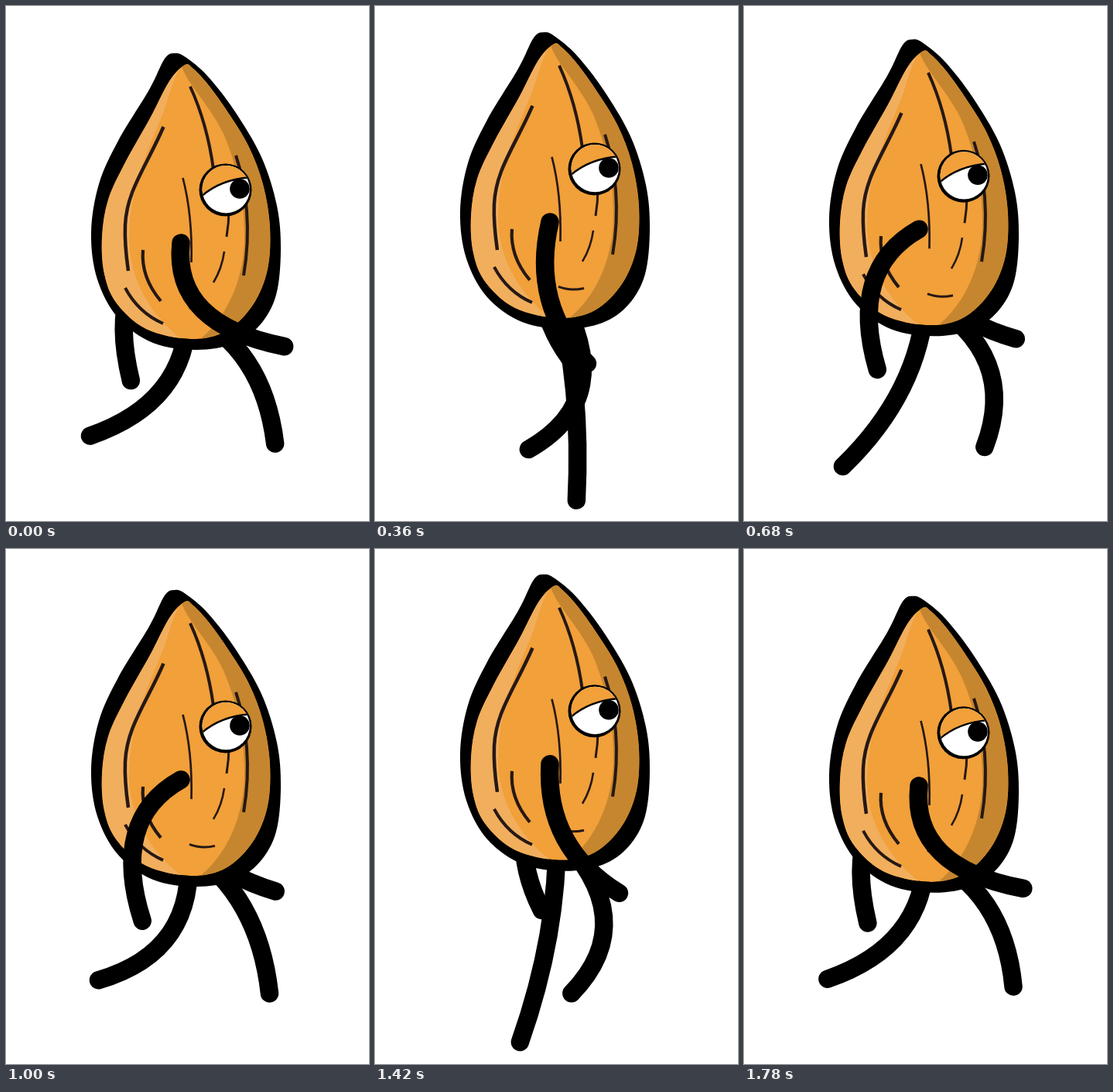
Recreate the animation shown at these times as an HTML page with a canvas. Size 469x665 px, loop 1.8 s.

```html
<!DOCTYPE html>
<html lang="en">
<head>
<meta charset="utf-8">
<title>Walking almond</title>
<style>
html, body { margin: 0; width: 100%; height: 100%; overflow: hidden; background: #fff; }
canvas { display: block; }
</style>
</head>
<body>
<canvas id="stage" width="469" height="665"></canvas>
<script>
const ctx = document.getElementById('stage').getContext('2d');
const { sin, cos, max, PI } = Math;
const LOOP = 1800, STEP = 20, DEG = PI / 180;
const INK = '#000', GROOVE = '#261815', SKIN = '#f1a03a', LIGHT = '#f1ae5c', SHADE = '#c6862f';

// Smooth closed curve through a few points.
function blob(points) {
  const n = points.length, path = new Path2D();
  const at = i => points[(i + n) % n];
  path.moveTo(...points[0]);
  for (let i = 0; i < n; i++) {
    const a = at(i - 1), b = at(i), c = at(i + 1), d = at(i + 2);
    path.bezierCurveTo(b[0] + (c[0] - a[0]) / 6, b[1] + (c[1] - a[1]) / 6,
      c[0] - (d[0] - b[0]) / 6, c[1] - (d[1] - b[1]) / 6, ...c);
  }
  path.closePath();
  return path;
}

const shell = blob([[218, 61], [232, 66], [260, 90], [295, 135], [330, 195], [350, 258], [355, 315],
  [349, 373], [328, 412], [294, 436], [245, 444], [190, 435], [145, 403], [118, 353], [110, 293],
  [120, 230], [145, 174], [185, 108], [205, 68]]);
const nut = blob([[231, 76], [242, 81], [260, 100], [284, 133], [313, 180], [332, 230], [341, 285],
  [338, 340], [319, 386], [284, 420], [238, 430], [181, 417], [143, 384], [127, 346], [124, 298],
  [132, 250], [154, 202], [186, 145], [211, 97]]);
const light = new Path2D('M228 74 C212 100 210 125 198 150 C180 195 160 235 159 300 C159 350 185 400 232 434 L100 440 L100 60 Z');
const shade = new Path2D('M225 72 C232 100 262 125 281 165 C298 205 309 250 308 305 C306 355 285 405 246 434 L370 440 L370 70 Z');
const lid = new Path2D('M247 251 Q274 223 320 221 L320 200 L245 200 Z');
const grooves = [
  [4, 'M238 104 Q260 152 268 211'],
  [4.5, 'M203.500 156 C181 208 156 238 154 283 C153 308 156 328 158 342'],
  [2.7, 'M228.500 222 Q241 270 239.500 331'],
  [4.2, 'M177 315 Q174 350 200 381'],
  [4, 'M154 364 Q171 396 203 410'],
  [4, 'M297 193 C311 235 317 290 307 348'],
  [3, 'M288 262 Q288 280 285 298'],
  [2.6, 'M282 317 Q279 339 268 357'],
  [3, 'M237 389.500 Q252 395.500 270 391.500']
].map(([w, d]) => [w, new Path2D(d)]);

// A limb hangs at an angle from straight down; bow and slide place the middle
// of the curve beside and along the straight line from joint to tip.
function limb(x, y, angle, reach, bow, slide) {
  const dx = sin(angle), dy = cos(angle);
  const knee = reach / 2 + 2 * slide;
  ctx.beginPath();
  ctx.moveTo(x, y);
  ctx.quadraticCurveTo(x + dx * knee + dy * 2 * bow, y + dy * knee - dx * 2 * bow,
    x + dx * reach, y + dy * reach);
  ctx.strokeStyle = INK;
  ctx.lineWidth = 23.5;
  ctx.lineCap = 'round';
  ctx.stroke();
}

function arm(phase) {
  const angle = (12.5 + 33.5 * cos(phase + 14 * DEG)) * DEG;
  const bow = 33.5 + 8 * cos(2 * phase + 20 * DEG);
  limb(226, 306, angle, 189, -bow, 27 - bow);
}

// The leg stretches while it pushes and bows while it swings forward.
function leg(phase, dy) {
  const skew = (2.5 + 7 * sin(2 * phase + 10 * DEG)) * DEG;
  const angle = (-2.4 + 36 * cos(phase + skew)) * DEG;
  const push = max(0, sin(phase)) ** 1.8;
  const swing = max(0, -sin(phase));
  const bow = 32 - 22 * push + 20 * swing - 4 * cos(phase);
  limb(235, 395 + dy, angle, 204 + 74 * push + 4 * swing, bow, 14 * swing - 5);
}

function fill(path, color) {
  ctx.fillStyle = color;
  ctx.fill(path);
}

function disc(x, y, r, color) {
  const path = new Path2D();
  path.arc(x, y, r, 0, 2 * PI);
  fill(path, color);
  return path;
}

function eye() {
  disc(283.5, 237.5, 34, INK);
  const ball = disc(284.2, 236.7, 30.7, '#fff');
  ctx.save();
  ctx.clip(ball);
  disc(302, 236, 12.8, INK);
  fill(lid, SKIN);
  ctx.strokeStyle = INK;
  ctx.lineWidth = 2.4;
  ctx.stroke(lid);
  ctx.restore();
}

function body() {
  fill(shell, INK);
  ctx.save();
  ctx.clip(nut);
  fill(nut, SKIN);
  fill(light, LIGHT);
  fill(shade, SHADE);
  ctx.restore();
  ctx.strokeStyle = GROOVE;
  ctx.lineCap = 'butt';
  for (const [w, path] of grooves) {
    ctx.lineWidth = w;
    ctx.stroke(path);
  }
  eye();
}

function draw(t) {
  const phase = 2 * PI * t / LOOP;
  // Two bobs per loop, the second step a little higher.
  const dy = -14 * (1 - cos(2 * phase)) - 2.5 * (1 - cos(phase));
  ctx.fillStyle = '#fff';
  ctx.fillRect(0, 0, 469, 665);
  leg(phase, dy);
  leg(phase + PI, dy);
  ctx.save();
  ctx.translate(0, dy);
  arm(phase + PI);
  body();
  arm(phase);
  ctx.restore();
}

let start;
function tick(now) {
  if (start === undefined) start = now;
  draw(Math.floor(max(0, now - start) % LOOP / STEP) * STEP);
  requestAnimationFrame(tick);
}
draw(0);
requestAnimationFrame(tick);
</script>
</body>
</html>
```
